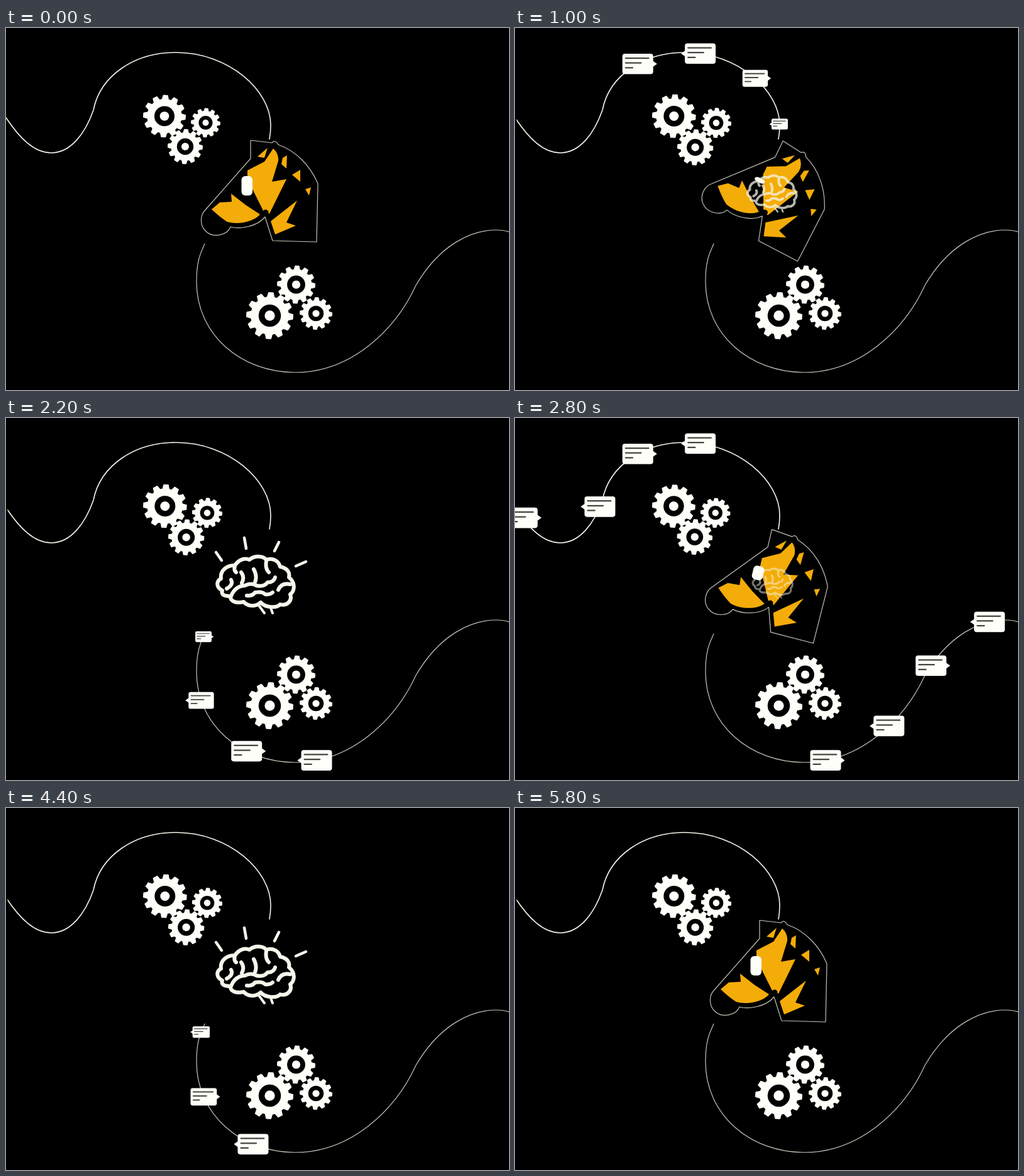
Recreate the animation shown at these times as an HTML page. Size 800 px wide and 577 px high, loop 6000 ms.

```html
<!DOCTYPE html>
<html lang="en">
<head>
<meta charset="utf-8">
<title>Messages on the mind</title>
<style>
html, body { margin: 0; width: 100%; height: 100%; overflow: hidden; background: #000; }
svg { display: block; width: 800px; height: 577px; }
.line { fill: none; stroke: #f6f6ec; stroke-linecap: round; stroke-linejoin: round; }
.thin { stroke: #c4c4b8; stroke-width: 1.2; }
.white { fill: #fffffa; }
.orange { fill: #f4ac08; }
</style>
</head>
<body>
<svg viewBox="0 0 800 577">
  <rect width="800" height="577"/>
  <path id="inbound" class="line" stroke-width="1.6" d="M0 143C22 176 45 199 72 199C103 199 126 168 139 131C150 75 205 39 270 39C355 39 421 100 421 155Q421 166 419 177"/>
  <path id="outbound" class="line thin" d="M316 344L310 358C303 375 303 395 303 404C303 490 375 549 460 549C550 549 620 480 652 410C690 345 740 322 780 322Q792 322 800 325"/>
  <rect id="edge" y="130" width="2.5" height="20"/>
  <g id="upperGears"></g>
  <g id="lowerGears"></g>
  <g id="bubbles"></g>
  <g id="head">
    <path class="line thin" style="fill:#000" d="M389 179L423 183Q428 177 433 186C462 196 484 220 496 248L494 341L424 339L412 301C399 317 372 321 357 317C352 330 331 335 319 325C308 316 308 299 317 290L389 208Z"/>
    <g class="orange">
      <path d="M327 289L340 278L359 277L358 264L381 282L404 297C394 309 370 314 352 309Q342 303 327 289Z"/>
      <path d="M384 227L411 213L425 192Q434 200 433 212L423 245L446 241L419 296L409 291L384 241Z"/>
      <path d="M400 205L416 191L411 207Z"/>
      <path d="M440 207L447 203L446 224L438 217Z"/>
      <path d="M455 234L468 226L468 245Z"/>
      <path d="M476 257L485 254L482 267Z"/>
      <path d="M421 308L463 275L446 310L461 315L428 329Z"/>
    </g>
    <circle cx="413" cy="294" r="4.5"/>
    <rect id="eye" class="white" x="374.5" width="17.5" rx="6"/>
    <path id="squint" fill="none" stroke="#fffffa" stroke-width="7" stroke-linejoin="round" d="M390 239L376 248L394 253"/>
  </g>
  <g id="brain" class="line" stroke-width="6">
    <path d="M364 235C370 226 380 222 387 226C395 219 408 219 414 226C424 222 434 228 436 237C447 239 452 246 450 254C460 262 460 275 452 281C456 292 446 300 436 297C430 304 412 302 405 294C396 302 384 300 378 293C366 296 356 292 357 284C346 284 342 281 344 275C334 270 334 260 342 256C340 243 352 234 364 235Z"/>
    <path d="M358 258Q362 266 351 272M364 236Q362 243 366 246M375 263Q380 254 374 246M394 241Q400 252 396 262M414 228Q412 240 418 246M358 284Q364 268 380 267Q390 262 398 267Q410 270 416 262Q426 262 428 254M383 283Q392 284 396 278Q408 276 412 281Q420 282 424 278M433 274Q438 262 452 265"/>
    <path stroke-width="4" d="M403 300L411 311M420 300L424 311"/>
  </g>
  <path id="rays" class="line" stroke-width="4.5" d="M334 214L343 227M379 191L382 208M434 198L427 212M477 229L461 236"/>
</svg>
<script>
const LOOP = 6000, STEP = 200, CYCLE = 2200, CUT = 5800;
const $ = id => document.getElementById(id);

function add(parent, tag, attrs) {
  const el = document.createElementNS('http://www.w3.org/2000/svg', tag);
  set(el, attrs);
  return parent.appendChild(el);
}

function set(el, attrs) {
  for (const k in attrs) el.setAttribute(k, attrs[k]);
}

function gear(parent, x, y, r) {
  const teeth = 12, pts = [];
  for (let i = 0; i < teeth; i++) {
    for (const [offset, k] of [[-.36, .81], [-.2, 1], [.2, 1], [.36, .81]]) {
      const angle = (i + offset + .1) * 2 * Math.PI / teeth;
      pts.push([x + r * k * Math.sin(angle), y - r * k * Math.cos(angle)]);
    }
  }
  add(parent, 'polygon', { points: pts.join(' '), class: 'white', stroke: '#fffffa', 'stroke-linejoin': 'round' });
  add(parent, 'circle', { cx: x, cy: y, r: r * .48 });
  add(parent, 'circle', { cx: x, cy: y, r: r * .22, class: 'white' });
}
gear($('upperGears'), 252, 140.5, 33.5);
gear($('upperGears'), 317.5, 151, 23);
gear($('upperGears'), 285, 189, 27.5);
gear($('lowerGears'), 419.5, 458.5, 37);
gear($('lowerGears'), 461.5, 409, 30);
gear($('lowerGears'), 493, 455, 25.5);

// Start times of both trips for each group of four
const groups = [{ enter: 0, leave: 1600 }, { enter: CYCLE, leave: 3980 }];
const bubbles = [];
for (const group of groups) {
  for (let i = 0; i < 4; i++) {
    const el = add($('bubbles'), 'g', {}), side = i % 2 ? 1 : -1;
    add(el, 'path', { class: 'white', d: `M${side * 23} -5L${side * 30} 0L${side * 23} 5Z` });
    add(el, 'rect', { class: 'white', x: -24, y: -16, width: 48, height: 32, rx: 4 });
    add(el, 'path', { d: 'M-19 -9H17M-19 -1.5H5M-19 6H-8', stroke: '#45453c', 'stroke-width': 2.2, 'stroke-linecap': 'round' });
    bubbles.push({ el, group, i });
  }
}

// Bubbles rush in, slow down towards the head, then speed up again on the way out
const TRIP = 5;
const inDistance = n => 577 - 85 * n ** 1.1 - 58 * Math.exp(-4 * (TRIP - n));
const outDistance = n => 5 + 104 * n ** 1.05;

function place({ el, group, i }, t) {
  const left = TRIP - ((t - group.enter) / STEP - i);
  const gone = (t - group.leave) / STEP - i;
  const inside = left >= 0 && left <= TRIP;
  const path = $(inside ? 'inbound' : 'outbound');
  const steps = inside ? left : gone;
  const distance = inside ? inDistance(left) : outDistance(Math.max(gone, 0));
  const shown = t > group.enter && t < CUT && steps >= 0 && distance < path.getTotalLength();
  set(el, { visibility: shown ? 'visible' : 'hidden' });
  if (!shown) return;
  const { x, y } = path.getPointAtLength(distance);
  set(el, { transform: `translate(${x} ${y}) scale(${Math.min(1.02, .54 + .3 * steps)})` });
}

const ramp = (x, from, to) => Math.min(1, Math.max(0, (x - from) / (to - from)));

function draw(t) {
  const c = t <= CYCLE ? t : t - CYCLE;
  const back = ramp(c, 3000, 3400);
  const pose = back ? 0 : c;

  // The head sinks, snaps up and gives way to the brain
  const sink = ramp(pose, 0, 1000), snap = ramp(pose, 1000, 1600);
  const tilt = 26 * sink ** 1.36 - 31 * snap ** 2.7;
  const shift = -10 * ramp(pose, 900, 1500);
  set($('head'), {
    transform: `translate(${shift} ${shift * .3}) rotate(${tilt} 405 264)`,
    opacity: back || 1 - ramp(c, 1600, 2000)
  });

  const open = 1 - .77 * sink ** 2;
  set($('eye'), { y: 251.5 - 15.5 * open, height: 31 * open, opacity: snap ? 0 : 1 });
  set($('squint'), { opacity: snap ? 1 : 0 });

  const grow = ramp(c, 0, CYCLE);
  set($('brain'), {
    transform: `translate(${410 - 13 * grow ** 3} 261) scale(${.34 + .66 * grow}) translate(-397 -261)`,
    opacity: Math.sin(ramp(c, 0, 1900) * Math.PI / 2) * (1 - back)
  });
  set($('rays'), { opacity: ramp(c, 1900, CYCLE) * (1 - ramp(c, 2900, 3100)) });

  const swell = 1 + .025 * ramp(c, 200, 1000);
  set($('upperGears'), { transform: `translate(218 140) scale(${swell}) translate(-218 -140)` });
  set($('edge'), { opacity: t > 0 ? 1 : 0 });
  for (const bubble of bubbles) place(bubble, t);
}

const start = performance.now();
function tick() {
  const t = (performance.now() - start) % LOOP;
  draw(Math.floor(t / STEP) * STEP);
  requestAnimationFrame(tick);
}
tick();
</script>
</body>
</html>
```
